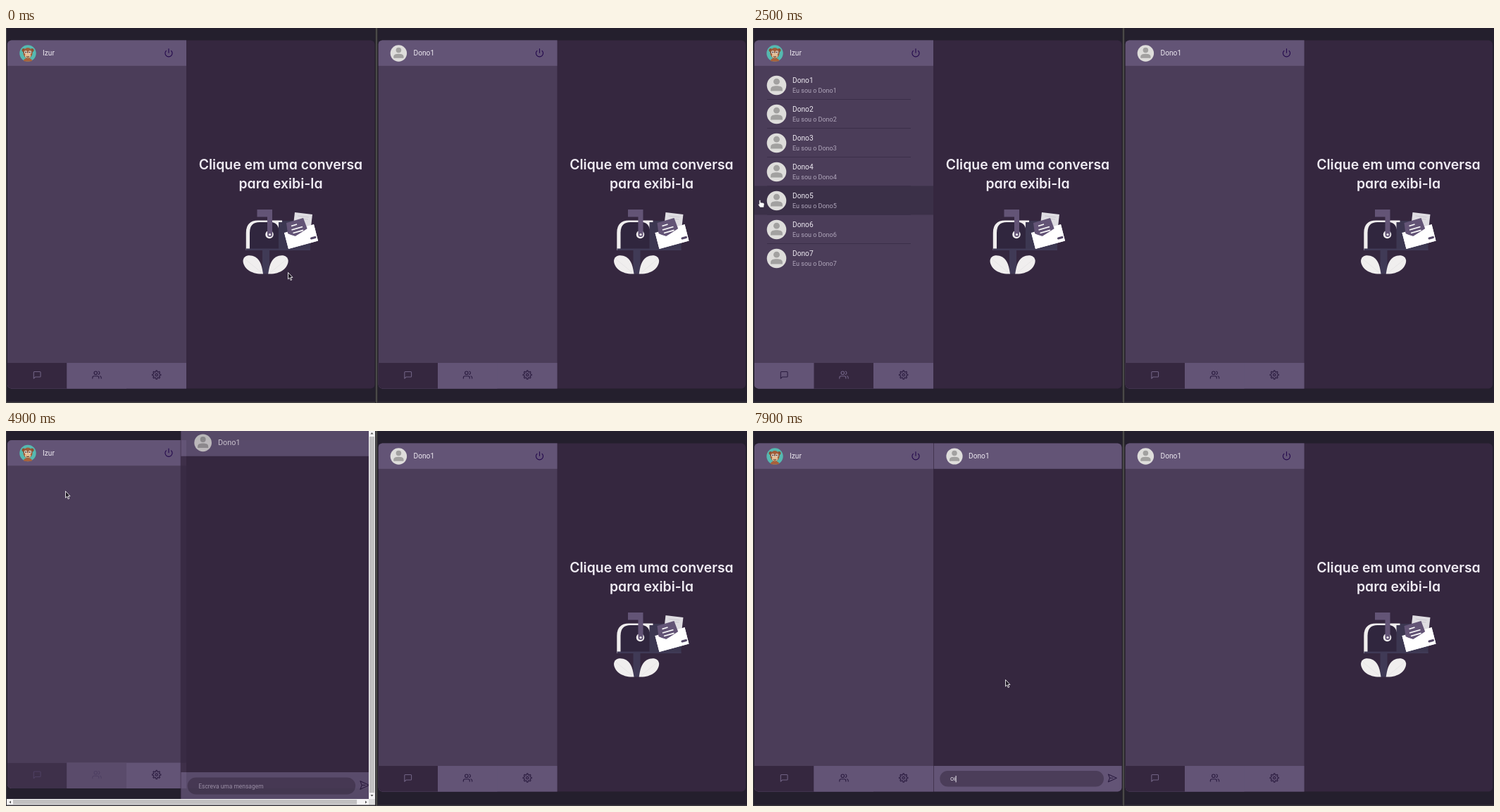
These frames come from a looping animation (1052 px wide and 533 px high, 8 s). An HTML page:

```html
<!DOCTYPE html>
<html lang="pt-BR">
<head>
<meta charset="utf-8">
<title>Chat</title>
<style>
  html, body { margin: 0; width: 100%; height: 100%; overflow: hidden; background: #241f2d; }
  svg { display: block; width: 100vw; height: 100vh; font-family: Roboto, sans-serif; }
  .name { font-size: 10.2px; fill: #ece8f0; }
  .bio { font-size: 9px; fill: #b0a6bb; }
  .field { font-size: 7.95px; }
  .title { font: 600 19.4px Inter, sans-serif; font-feature-settings: "cv11"; fill: #efebf3; text-anchor: middle; }
  .icon { fill: none; stroke-width: 2; stroke-linecap: round; stroke-linejoin: round; }
</style>
</head>
<body>
<svg id="stage" viewBox="0 0 1052 533" preserveAspectRatio="none"></svg>
<script>
const LOOP = 8000, STEP = 100;
const BAR = '#635476', SIDE = '#4b3d59', DARK = '#35273f', INK = '#2b1c40', DIM = '#706284';
const $ = id => document.getElementById(id);
const set = (id, attrs) => { for (const k in attrs) $(id).setAttribute(k, attrs[k]); };
const show = (id, on) => set(id, { visibility: on ? 'visible' : 'hidden' });
const ramp = (t, from, length) => Math.max(0, Math.min(1, (t - from) / length));
const rect = (x, y, w, h, fill, more = '') =>
  `<rect x="${x}" y="${y}" width="${w}" height="${h}" fill="${fill}" ${more}/>`;
const circle = (x, y, r, fill) => `<circle cx="${x}" cy="${y}" r="${r}" fill="${fill}"/>`;
const text = (x, y, cls, str) => `<text x="${x}" y="${y}" class="${cls}">${str}</text>`;
const path = (d, fill, more = '') => `<path d="${d}" fill="${fill}" ${more}/>`;

function mix(a, b, k) {
  const part = (c, i) => parseInt(c.slice(i, i + 2), 16);
  return `rgb(${[1, 3, 5].map(i => Math.round(part(a, i) + (part(b, i) - part(a, i)) * k))})`;
}

function gear() {
  const pts = [];
  for (let i = 0; i < 96; i++) {
    const a = i / 96 * 2 * Math.PI, r = 9.3 + 1.7 * Math.tanh(2.5 * Math.cos(8 * a));
    pts.push((12 + r * Math.cos(a)).toFixed(1) + ' ' + (12 + r * Math.sin(a)).toFixed(1));
  }
  return `M${pts.join('L')}ZM15 12a3 3 0 1 1-6 0a3 3 0 1 1 6 0`;
}

const ICONS = {
  message: 'M21 15a2 2 0 0 1-2 2H7l-4 4V5a2 2 0 0 1 2-2h14a2 2 0 0 1 2 2z',
  users: 'M17 21v-2a4 4 0 0 0-4-4H5a4 4 0 0 0-4 4v2M13 7a4 4 0 1 1-8 0a4 4 0 1 1 8 0M23 21v-2a4 4 0 0 0-3-3.87M16 3.13a4 4 0 0 1 0 7.75',
  gear: gear(),
  power: 'M18.36 6.64a9 9 0 1 1-12.73 0M12 2v10',
  send: 'M1 2L23 12L1 22L5 12ZM5 12H13'
};
const icon = (name, x, y, color, size = 13, id = '') =>
  `<path ${id && `id="${id}"`} class="icon" stroke="${color}" d="${ICONS[name]}"
    transform="translate(${x - size / 2} ${y - size / 2}) scale(${size / 24})"/>`;

const person = (x, y, r) => `<g transform="translate(${x} ${y}) scale(${r / 14})">
  ${circle(0, 0, 14, '#dedddb')}${circle(0, -5.4, 4.5, '#a2a1a0')}
  ${path('M-8.5 8V5.5C-8.5 1.5-4 .8 0 .8S8.5 1.5 8.5 5.5V8Z', '#a2a1a0')}</g>`;

const monkey = (x, y) => `<g transform="translate(${x} ${y})">
  ${circle(0, 0, 11.7, '#55b9b0')}${circle(-6, -4.5, 2.5, '#8b5134')}${circle(6, -4.5, 2.5, '#8b5134')}
  ${path('M-6 11C-6 5 6 5 6 11Q0 12.5-6 11', '#a8613b')}
  <ellipse cy="-.5" rx="6.6" ry="7.4" fill="#a05c38"/>
  <ellipse cy="3" rx="4.2" ry="3.6" fill="#e3bd94"/>
  ${circle(-2.9, -1.5, 2.3, '#eee2d0')}${circle(2.9, -1.5, 2.3, '#eee2d0')}
  ${path('M-6-1.5H-5M5-1.5H6M-.7-1.5H.7M-2 4.5Q0 6 2 4.5', 'none', 'stroke="#4b2b28"')}
  ${circle(-2.8, -1.4, 1, '#402426')}${circle(2.8, -1.4, 1, '#402426')}</g>`;

const leaf = 'M365 349.5C349 350.5 337 342 336.5 331C337 323 346 321 354 325.5C362 330.5 363.5 340 365 349.5Z';
const mailbox = `
  ${path('M387 274H412Q432 278 432 300V316H387Z', '#3c3751')}
  ${path('M340.8 316V291Q340.8 273.5 358 273.5H392V316Z', '#f0eeee')}
  ${path('M346 316V291Q346 276 360 276H378Q388 278 388 292V316Z', '#30263e')}
  ${path('M387 276H398V314H387Z', '#3c3751')}
  ${rect(341, 313.5, 91, 2.5, '#403a56')}
  ${circle(374, 293.5, 5.7, '#f0eeee')}
  ${path('M356.5 258H378V293.5A3.5 3.5 0 0 1 371 293.5V268.5H356.5Z', BAR)}
  ${circle(374.5, 293.5, 1.6, '#f0eeee')}
  ${rect(364, 316, 10, 33.5, '#403a56')}
  ${path(leaf, '#f0eeee')}<g transform="translate(737.2) scale(-1 1)">${path(leaf, '#f0eeee')}</g>
  ${path('M340 329L362 347M398 329L376 347', 'none', 'stroke="#dddadd" stroke-width=".5"')}
  ${path('M410 262L435 265L432 291L407 288Z', '#dfdde2')}
  ${path('M414 267L430 269M419 271L429 272', 'none', 'stroke="#c9c6ce"')}
  ${path('M395 291L437 279L443 302.5L401 314Z', '#fff')}
  ${path('M398 277L422 270L428 286L409 297L400 292Z', BAR)}
  ${path('M405 281.5L413 279M405.5 287L421 282.5M407.5 291.5L422 287.3', 'none', 'stroke="#fff" stroke-width="1.8"')}
  ${path('M395 291L411 296L437 279L443 302.5L401 314Z', '#fff')}
  ${path('M433.5 299L439 297.5', 'none', 'stroke="#544767" stroke-width="3" stroke-linecap="round"')}`;

const intro = text(390, 201, 'title', 'Clique em uma conversa') +
  text(390, 228, 'title', 'para exibi-la') + mailbox;

const sidebar = (avatar, name, p, list = '') => `
  ${rect(2, 17, 254, 496, SIDE)}${rect(2, 17, 254, 36.8, BAR)}
  ${avatar}${text(52, 39.3, 'name', name)}${icon('power', 231, 35.3, '#24094c', 13.5)}
  ${list}${rect(2, 476, 254, 37, BAR)}
  ${rect(2, 476, 84.5, 37, DARK, `id="${p}tab0"`)}${rect(86.5, 476, 84.5, 37, BAR, `id="${p}tab1"`)}
  ${icon('message', 44.2, 493.3, DIM, 13, p + 'icon0')}${icon('users', 129, 493, INK, 13.5, p + 'icon1')}
  ${icon('gear', 213.7, 493, INK, 13.5)}`;

const ROW = 41, TOP = 60.5;
let rows = rect(2, TOP, 254, ROW, '#3b3048', 'id="hover"');
for (let i = 0; i < 7; i++) {
  const y = TOP + i * ROW, name = 'Dono' + (i + 1);
  rows += person(33.5, y + 21, 13.8) + text(56, y + 17.7, 'name', name) +
    text(56, y + 31.7, 'bio', 'Eu sou o ' + name);
  if (i < 6) rows += rect(20, y + ROW - .5, 204, 1, '#3b2f49');
}

const chat = `<g clip-path="url(#chatClip)">
  ${rect(256, 17, 268, 496, DARK)}${rect(256.7, 17, 268, 36.8, BAR)}${rect(256.7, 476, 268, 37, BAR)}
  ${person(286, 36, 11.6)}${text(306, 39.3, 'name', 'Dono1')}
  ${rect(265.3, 483, 232.7, 22.5, SIDE, 'id="input" rx="11.2"')}
  <text id="message" x="280" y="497.2" class="field"></text>
  ${rect(280, 490, 1, 9.3, '#eeeaf2', 'id="caret"')}
  <g id="send">${icon('send', 510.3, 493.3, INK, 13)}</g></g>`;

const scrollbars = `${rect(515, 0, 9, 532, '#f4f3f4')}${rect(1, 523, 523, 9, '#f4f3f4')}
  ${rect(515, 523, 9, 9, '#dcdcdc')}
  ${rect(516, 8, 7, 500, '#c1c0c1', 'id="thumbY"')}${rect(10, 524, 487, 6.5, '#c1c0c1', 'id="thumbX"')}
  ${path('M517.5 4.5h4l-2-2.5zM517.5 517h4l-2 2.5zM7 525.5v4l-2.5-2zM510 525.5v4l2.5-2z', '#505050')}`;

$('stage').innerHTML = `<defs>
    <clipPath id="panel"><rect x="2" y="17.5" width="521.5" height="495" rx="6"/></clipPath>
    <clipPath id="chatClip"><rect id="chatBox" x="200" y="17.5" height="495" rx="6"/></clipPath>
    <clipPath id="view"><rect id="viewBox" x="1" y="0"/></clipPath>
  </defs>
  ${rect(0, 0, 1052, 533, '#241f2d')}
  <g id="left"><g clip-path="url(#panel)">
    ${rect(2, 17, 522, 496, DARK)}
    ${sidebar(monkey(31, 36), 'Izur', 'a', `<g id="list">${rows}</g>`)}
    <g id="intro">${intro}</g></g></g>
  <g clip-path="url(#view)"><g id="chat">${chat}</g></g>
  <g id="scroll">${scrollbars}</g>
  <g transform="translate(526.5)"><g clip-path="url(#panel)">
    ${rect(2, 17, 522, 496, DARK)}${sidebar(person(30.9, 36, 11.7), 'Dono1', 'b')}${intro}</g></g>
  <g id="frame"><rect width="1" height="533"/><rect y="531.5" width="525" height="1.5"/></g>
  ${rect(524, 0, 4, 533, '#29272c')}${rect(525, 0, 2, 533, '#4a4949')}
  ${rect(527, 531.5, 525, 1.5, '#3b393f')}
  <g id="cursor">
    <path id="arrow" d="M.5 .5V10L2.6 8L4.2 11.6L5.7 11L4.2 7.5H7Z" fill="#1d1822" stroke="#f2f0f2" stroke-width=".9"/>
    <path id="hand" d="M-1.2 .6Q-.2-.8 .8 .6V3.5L4.5 4Q6 4.4 6 5.8L5.3 10.5H0L-2.6 6.8Q-2.8 5.4-1.2 6Z"
      fill="#fff" stroke="#2c2534" stroke-width=".5"/>
    <path id="beam" d="M-2-6H2M0-6V6M-2 6H2" fill="none" stroke="#f2f0f2"/>
  </g>`;

// Pointer keys: time, x, y
const KEYS = [
  [0, 400, 347], [200, 400, 347], [300, 401, 347], [500, 401, 347], [900, 327, 385], [1000, 327, 385],
  [1200, 225, 468], [1400, 161.5, 486], [1700, 131, 491], [1900, 131, 490], [2200, 70, 370],
  [2500, 10, 244.5], [2700, 14, 200], [2900, 90, 196], [3200, 236, 165], [3400, 170, 85],
  [3600, 88, 79], [3700, 89, 79], [3900, 89, 79], [4200, 84, 85], [5100, 84, 85],
  [5400, 307, 257], [5500, 307, 257], [5900, 308, 440], [6200, 306, 494], [6400, 305.5, 495],
  [6500, 345, 379], [6700, 345, 379], [6800, 358, 353], [LOOP, 358, 353]
];
function pointer(t) {
  const i = KEYS.findIndex(k => k[0] > t), a = KEYS[i - 1], b = KEYS[i];
  const k = (t - a[0]) / (b[0] - a[0]);
  return [a[1] + (b[1] - a[1]) * k, a[2] + (b[2] - a[2]) * k];
}

// The icon fades more slowly than the tab behind it
function tab(n, fade) {
  set('atab' + n, { fill: mix(BAR, DARK, fade(250)) });
  set('aicon' + n, { stroke: mix(INK, DIM, fade(400)) });
}

function draw(time) {
  const t = Math.floor(time / STEP) * STEP;
  const [x, y] = pointer(t);
  const open = t >= 4700, listed = t >= 1900 && !open;

  tab(0, d => open ? ramp(t, 4700, d) : 1 - ramp(t, 1850, d));
  tab(1, d => open ? 1 - ramp(t, 4700, d) : ramp(t, 1220, d));

  set('list', { opacity: listed ? ramp(t, 1800, 300) : 0 });
  const row = Math.floor((y - TOP) / ROW);
  set('hover', { y: TOP + row * ROW, opacity: listed && row >= 0 && row < 7 ? 1 : 0 });

  // The chat shrinks into place and overflows the page meanwhile
  const rest = (1 - ramp(t, 4700, 400)) ** 2, busy = open && rest > 0;
  const scale = 1 + .256 * rest, cut = busy ? 8.5 : 0, lift = busy ? -4.5 : 0;
  const cx = (256 + 523.5 - cut) / 2;
  set('left', { transform: `translate(0 ${lift})` });
  show('intro', !open);
  show('chat', open);
  set('chat', {
    opacity: 1 - .8 * rest,
    transform: `translate(${cx} ${265 + lift}) scale(${scale}) translate(${-cx} -265)`
  });
  set('chatBox', { width: 323.5 - cut });
  set('viewBox', { width: busy ? 514 : 523, height: busy ? 523 : 533 });
  set('input', { width: 232.7 - cut });
  set('send', { transform: `translate(${-cut})` });
  show('scroll', busy);
  const over = 130 * (scale - 1);
  set('thumbX', { width: 496 * 515 / (515 + over) });
  set('thumbY', { height: 507 * 523 / Math.max(523, 260.5 + 247.5 * scale) });

  const typed = t < 7600 ? '' : t < 7900 ? 'O' : 'Oi';
  const message = $('message');
  message.textContent = typed || 'Escreva uma mensagem';
  message.setAttribute('fill', typed ? '#eeeaf2' : '#b0a5bb');
  set('caret', {
    x: 280 + [0, 5.6, 7.6][typed.length],
    opacity: (t >= 6300 && t < 6800) || t >= 7400 ? 1 : 0
  });

  set('frame', { fill: t < 1500 ? '#464547' : '#37353b' });

  const kind = t >= 1250 && t < 4700 ? 'hand' : t > 5400 && y > 483 ? 'beam' : 'arrow';
  for (const c of ['arrow', 'hand', 'beam']) show(c, c === kind);
  set('cursor', { transform: `translate(${x} ${y})` });
}

const start = performance.now();
function tick() {
  draw((performance.now() - start) % LOOP);
  requestAnimationFrame(tick);
}
tick();
</script>
</body>
</html>
```
